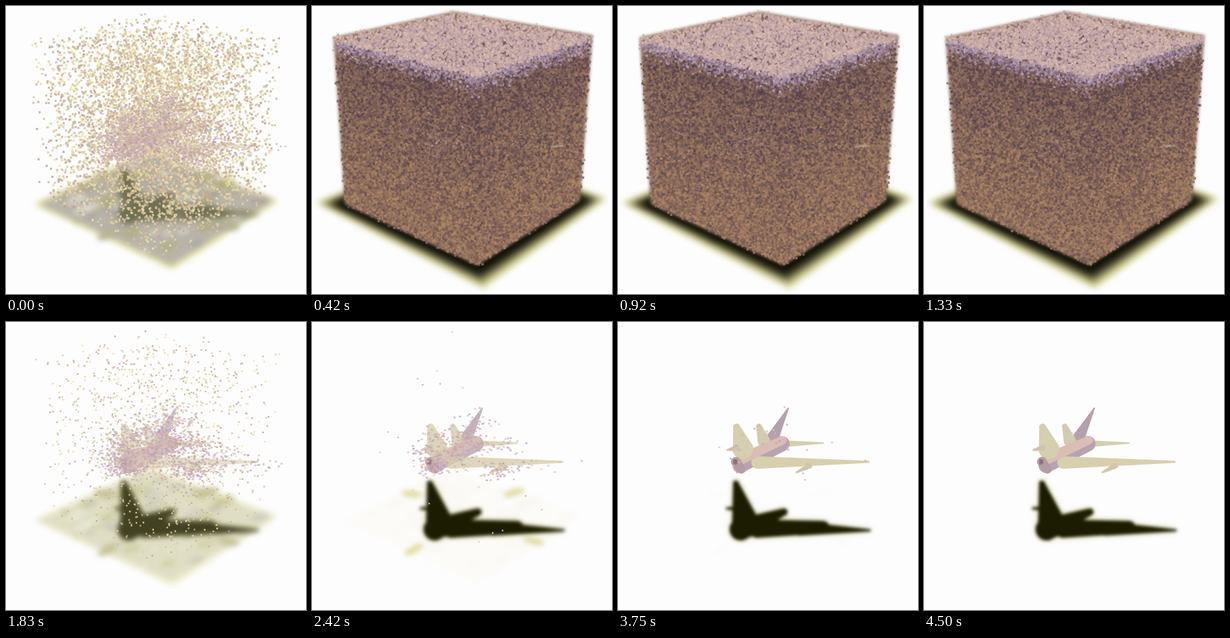
Recreate the animation shown at these times as an HTML page with a canvas. Size 430 by 414 pixels, loop 5.26 s.

```html
<!DOCTYPE html>
<html lang="en">
<head>
<meta charset="utf-8">
<title>Noise to aircraft</title>
<style>
  html, body { margin: 0; width: 100%; height: 100%; overflow: hidden; background: #fdfdfe; }
  canvas { display: block; }
</style>
</head>
<body>
<canvas id="stage" width="430" height="414"></canvas>
<script>
const ctx = document.getElementById('stage').getContext('2d');
const LOOP = 5260, STEP = 83.35, LAST = 54, SHADES = 10;

const clamp = v => Math.max(0, Math.min(1, v));
const mix = (a, b, t) => a + (b - a) * t;
const decay = (k, from, rate) => Math.min(1, Math.exp((from - k) * rate));

function rng(seed) {
  return () => {
    seed = (seed + 0x6D2B79F5) | 0;
    let v = Math.imul(seed ^ (seed >>> 15), 1 | seed);
    v = (v + Math.imul(v ^ (v >>> 7), 61 | v)) ^ v;
    return ((v ^ (v >>> 14)) >>> 0) / 4294967296;
  };
}

// Shades between a light and a dark tone
const ramp = (light, dark) => Array.from({ length: SHADES }, (_, n) =>
  `rgb(${light.map((c, i) => Math.round(mix(c, dark[i], n / (SHADES - 1))))})`);
const shade = (tones, t) => tones[clamp(t) * (SHADES - 1) + 0.5 | 0];

const TONES = {
  side: ramp([176, 136, 102], [84, 64, 76]),
  top: ramp([224, 194, 178], [186, 158, 164]),
  rim: ramp([200, 178, 200], [138, 112, 136]),
  sparse: ramp([240, 232, 172], [190, 160, 146]),
  haze: ramp([222, 202, 172], [186, 150, 182])
};

// Cube corners on screen, in the order back, right, left, front
const FLOOR = [[207, 212], [384, 280], [47, 285], [237, 373]];
const ROOF = [[203, 8], [402, 42], [31, 45], [237, 95]];

const onFace = (face, x, y, axis) =>
  mix(mix(face[0][axis], face[1][axis], x), mix(face[2][axis], face[3][axis], x), y);

const project = (x, y, z) =>
  [0, 1].map(axis => mix(onFace(FLOOR, x, y, axis), onFace(ROOF, x, y, axis), z));

const polygon = pts => new Path2D('M' + pts.join('L') + 'Z');

// The floor grown by a margin, wider towards the viewer
const floorPath = m => polygon([[-m, -m], [1 + m, -m], [1 + 1.5 * m, 1 + 1.5 * m], [-m, 1 + m]]
  .map(([x, y]) => project(x, y, 0)));

const cubePath = polygon([ROOF[0], ROOF[1], FLOOR[1], FLOOR[3], FLOOR[2], ROOF[2]]);

// A rounded blade that tapers from radius r1 to r2
function blade(x1, y1, r1, x2, y2, r2) {
  const a = Math.atan2(y2 - y1, x2 - x1), q = Math.PI / 2, shape = new Path2D();
  shape.arc(x2, y2, r2, a - q, a + q);
  shape.arc(x1, y1, r1, a + q, a + 3 * q);
  shape.closePath();
  return shape;
}

function ellipse(x, y, rx, ry, turn) {
  const shape = new Path2D();
  shape.ellipse(x, y, rx, ry, turn, 0, 7);
  return shape;
}

const PLANE = [
  ['#b5a0ae', 221, 168, 9, 244, 124, 1],     // tail fin
  ['#d5ceaf', 234, 175, 5, 294, 174, 1],     // far tailplane
  ['#d3cbb0', 209, 171, 9, 202, 150, 4],     // inner fin
  ['#b9a2b4', 175, 206, 11, 235, 175, 11],   // fuselage
  ['#d8cfae', 200, 202, 9, 359, 201, 1.5],   // near wing
  ['#d2c6aa', 274, 207, 4, 256, 216, 1.5],   // pod
  ['#dabdb5', 178, 196, 8, 236, 170, 6],     // fuselage top
  ['#d5ceaf', 179, 182, 15, 170, 151, 5],    // far wing
  ['#cfc4ae', 170, 181, 4, 157, 184, 1.5],   // far wing tip
  ['#b59ca2', 169, 201, 7, 177, 212, 6],     // nose
  ['#8d7478', 168, 200, 3, 168, 202, 3]      // intake
];
const planeParts = PLANE.map(([color, ...b]) => [color, blade(...b)]);

const shadowPath = new Path2D();
for (const b of [[183, 290, 20, 169, 232, 4], [176, 298, 16, 238, 273, 5], [200, 297, 13, 294, 295, 9],
                 [260, 297, 10, 361, 299.5, 1.5], [170, 268, 3, 156, 268, 1.5], [172, 304, 9, 171, 300, 9]]) {
  shadowPath.addPath(blade(...b));
}

// Noise voxels: a filled volume plus a denser skin on the three visible faces
function makeVoxels() {
  const rand = rng(7), list = [];
  for (let n = 0; n < 55000; n++) {
    const p = [rand(), rand(), rand()];
    let limit = rand();
    if (n < 22000) {
      p[n % 7 < 3 ? 0 : n % 7 < 6 ? 1 : 2] = 1 - 0.06 * rand() ** 2;
      limit = 0.2 + 0.8 * limit;
    }
    const [x, y] = project(...p), z = p[2];
    const kind = z > 0.97 ? 'top' : rand() < (z - 0.86) * 9 ? 'rim' : 'side';
    list.push({ x, y, limit, kind, bias: kind === 'side' ? 0.45 * (z - 0.5) : 0, near: p[0] + p[1] + z });
  }
  return list.sort((a, b) => a.near - b.near);
}

// Loose voxels scattered around the parts of the aircraft
function makeHaze() {
  const rand = rng(21), spread = () => rand() + rand() + rand() - 1.5;
  return Array.from({ length: 2800 }, (_, n) => {
    const [, x1, y1, , x2, y2] = PLANE[n % PLANE.length];
    const t = rand(), limit = rand(), size = 10 + 24 * limit;
    return { x: mix(x1, x2, t) + spread() * size * 2, y: mix(y1, y2, t) + spread() * size, limit };
  });
}

function makePatches() {
  const rand = rng(5);
  return Array.from({ length: 60 }, (_, n) => {
    const [x, y] = project(rand(), rand(), 0), r = 4 + 12 * rand();
    return [ellipse(x, y, r, r / 2, -0.3), ['#ffffff', '#a5a548', '#9c98a4'][n % 3]];
  });
}

const voxels = makeVoxels(), haze = makeHaze(), patches = makePatches();
const half = voxels.length >> 1;

function fill(shape, color, alpha, blur) {
  if (alpha < 0.01) return;
  ctx.globalAlpha = alpha;
  ctx.filter = `blur(${blur}px)`;
  ctx.fillStyle = color;
  ctx.fill(shape);
  ctx.filter = 'none';
  ctx.globalAlpha = 1;
}

function drawGround(k) {
  const dark = clamp((19 - k) / 2);
  fill(floorPath(mix(0.02, 0.12, dark)), '#e6e2a2', decay(k, 20, 0.3), 5);
  fill(floorPath(0), '#a8a5ab', 0.75 * decay(k, 20, 0.6), 4);
  for (const [shape, color] of patches) fill(shape, color, 0.35 * decay(k, 20, 0.3), 3);

  const smudge = 0.8 * clamp((46 - k) / 14);
  for (const [x, y, turn] of [[143, 247, 0.1], [290, 245, -0.3], [146, 327, -0.5], [318, 315, 0.2]]) {
    fill(ellipse(x, y, 15, 5, turn), '#e2dd96', smudge, 3);
    fill(ellipse(x, y, 17, 6, turn), '#85858a', 0.5 * decay(k, 20, 0.25), 4);
  }

  const strength = clamp((k - 15) / 9);
  fill(shadowPath, '#b9b56a', strength * 0.7, 5);
  fill(shadowPath, '#1c1c02', strength, mix(4, 2.2, clamp((k - 20) / 15)));

  // Stacked layers darken the cube's own shadow inwards
  for (let n = 0; n < 5; n++) fill(floorPath(0.11 - 0.02 * n), '#0b0a02', dark * (0.12 + 0.17 * n), 4);
}

function drawVoxels(from, to, density, rand) {
  const full = density > 0.4;
  const size = mix(2.2, 3.2, clamp(density * 4));
  ctx.globalAlpha = full ? 0.72 : 0.85;
  for (let n = from; n < to; n++) {
    const v = voxels[n];
    if (v.limit > density) continue;
    ctx.fillStyle = shade(TONES[full ? v.kind : 'sparse'], rand() + (full ? v.bias : 0));
    ctx.fillRect(v.x + rand() * 5 - 2.5 - size / 2, v.y + rand() * 5 - 2.5 - size / 2, size, size);
  }
  ctx.globalAlpha = 1;
}

function drawHaze(amount, rand) {
  ctx.globalAlpha = 0.7;
  for (const h of haze) {
    if (h.limit > amount) continue;
    ctx.fillStyle = shade(TONES.haze, rand());
    ctx.fillRect(h.x + rand() * 3, h.y + rand() * 3, 3, 2.4);
  }
  ctx.globalAlpha = 1;
}

function render(step) {
  // The opening step is half noised; the cube then holds until it starts to thin out
  const k = step === 0 ? 19 : Math.max(step, 16);
  const density = decay(k, 16, 0.55);
  const rand = rng(step * 977 + 3);
  ctx.fillStyle = '#fdfdfe';
  ctx.fillRect(0, 0, 430, 414);
  drawGround(k);
  fill(cubePath, '#8f7060', clamp(density * 2 - 1), 2);
  drawVoxels(0, half, density, rand);
  for (const [color, shape] of planeParts) fill(shape, color, clamp(0.55 + (k - 20) * 0.03), 0.7);
  if (k > 18 && k < 52) drawHaze(decay(k, 18, 0.16), rand);
  drawVoxels(half, voxels.length, density, rand);
}

const start = performance.now();
let shown = -1;

function tick() {
  const t = (performance.now() - start) % LOOP;
  const step = Math.min(LAST, Math.floor((t + 6) / STEP));
  if (step !== shown) render(shown = step);
  requestAnimationFrame(tick);
}
tick();
</script>
</body>
</html>
```
